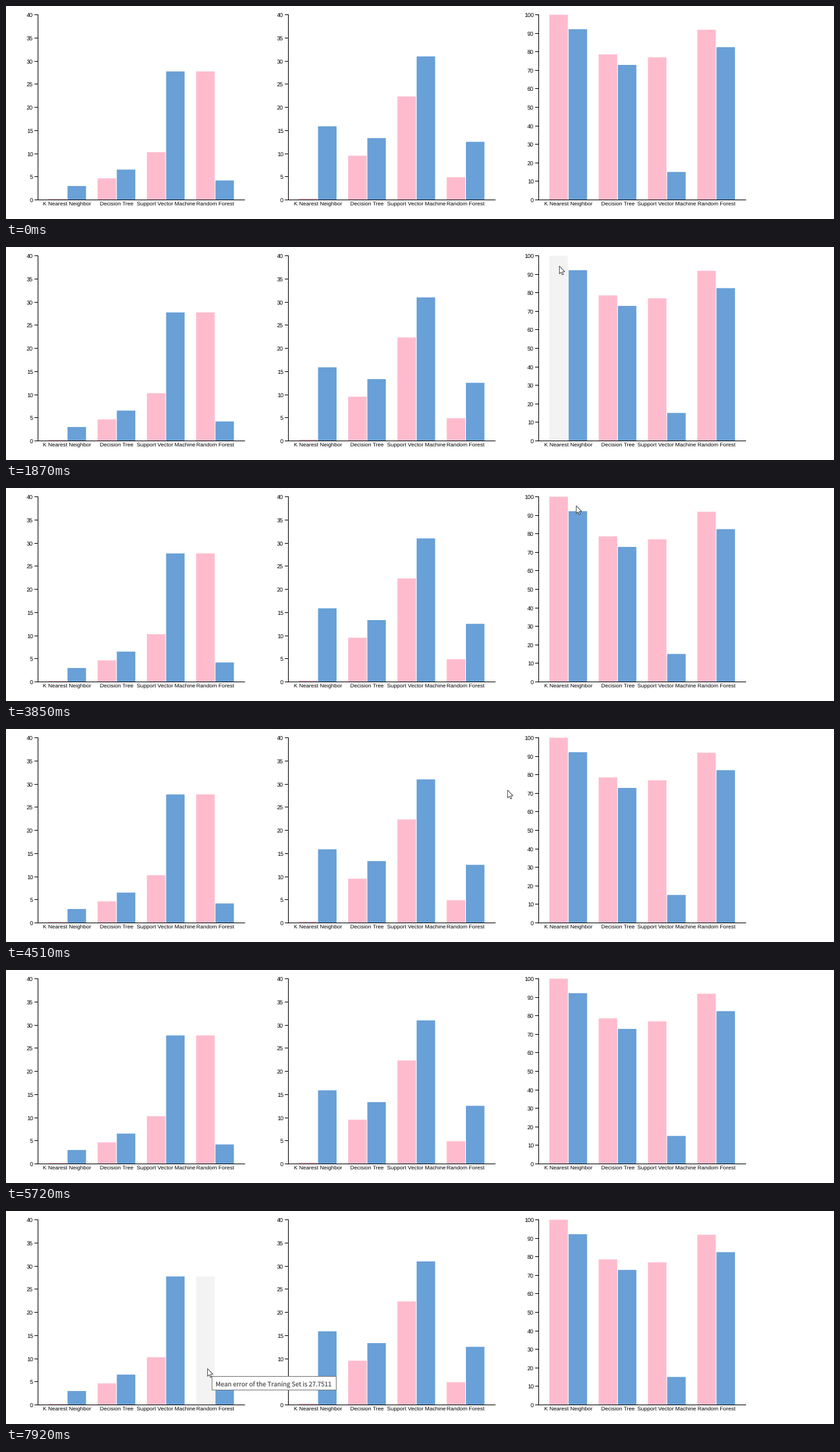
These frames come from a looping animation (1280x329 px, 8000 ms). A matplotlib script:

```python
import numpy as np
import matplotlib.pyplot as plt
from matplotlib.animation import FuncAnimation
from matplotlib.patches import Polygon, Rectangle

plt.rcParams["text.hinting"] = "none"

W, H, DPI = 1280, 329, 100
PX = 72 / DPI                       # points per pixel
LOOP, INTERVAL, STEP = 8000, 40, 110

PINK, BLUE, HOVER = "#ffbbce", "#68a0d7", "#f3f3f3"
BASE, TOP = 299.5, 13.5             # y of zero and of the axis maximum
FIRST_AXIS, CHART_GAP = 49, 387.3
GROUP_GAP, BAR_GAP, BAR_WIDTH = 76.2, 29.7, 28.6
MODELS = ["K Nearest Neighbor", "Decision Tree",
          "Support Vector Machine", "Random Forest"]

# axis maximum, tick step, training values, test values
CHARTS = [
    (40, 5, [0.2, 4.65, 10.3, 27.75], [3.0, 6.55, 27.75, 4.2]),
    (40, 5, [0.3, 9.55, 22.35, 4.9], [15.9, 13.35, 31.0, 12.55]),
    (100, 10, [100, 78.6, 77.0, 91.9], [92.2, 72.9, 15.1, 82.5]),
]

# pointer stops per visit: arrival step, leaving step, x, y
VISITS = [
    [(1, 1, 1119, 316), (4, 5, 1042, 315), (17, 34, 855, 29),
     (35, 35, 881, 27), (39, 40, 850, 100), (41, 41, 775, 94),
     (43, 44, 799, 3), (46, 46, 876, 54), (49, 50, 889, 171),
     (51, 51, 695, 250)],
    [(62, 62, 354, 316), (63, 72, 311, 243)],
]
HOVER_LAG = 0.25                    # the highlight trails the pointer, in steps

# tooltips: first step, end step, text
TIPS = [
    (22, 35, "Mean accuracy of the Traning Set is 100.00"),
    (70, 73, "Mean error of the Traning Set is 27.7511"),
]
FADE = 3                            # steps until a tooltip is solid

ARROW = 0.72 * np.array([(0, 0), (0, 16.5), (3.8, 13), (6.3, 18.8),
                         (8.8, 17.7), (6.4, 12), (11.6, 12)])

fig = plt.figure(figsize=(W / DPI, H / DPI), dpi=DPI, facecolor="white")
ax = fig.add_axes([0, 0, 1, 1])
ax.set_xlim(0, W)
ax.set_ylim(H, 0)
ax.axis("off")


def line(x0, y0, x1, y1):
    ax.plot([x0, x1], [y0, y1], color="black", lw=PX, zorder=3,
            solid_capstyle="butt", snap=False)


def label(x, y, text, ha, size):
    ax.text(x, y, text, ha=ha, va="baseline", color="black", zorder=3,
            family="Liberation Sans", size=size * PX)


def draw_chart(left, top_value, tick, train, test):
    """Draw one grouped bar chart and return its bars with their colours."""
    scale = (BASE - TOP) / top_value
    bars = []
    for i, model in enumerate(MODELS):
        x = left + 16.4 + GROUP_GAP * i
        for j, (values, color) in enumerate([(train, PINK), (test, BLUE)]):
            height = values[i] * scale
            bar = Rectangle((x + BAR_GAP * j, BASE - height), BAR_WIDTH,
                            height, facecolor=color, lw=0, zorder=1,
                            snap=False)
            ax.add_patch(bar)
            bars.append((bar, color))
        label(x + 29.4, 308.2, model, "center", 8.45)
    axis_x = np.floor(left) + 0.5
    line(axis_x, TOP - 0.5, axis_x, BASE + 0.5)
    line(axis_x, BASE, left + 320.5, BASE)
    for value in range(0, top_value + 1, tick):
        y = np.floor(BASE - value * scale) + 0.5
        line(axis_x - 5.5, y, axis_x, y)
        label(axis_x - 7.5, y + 3.2, str(value), "right", 9)
    return bars


bars = []
for n, chart in enumerate(CHARTS):
    bars += draw_chart(FIRST_AXIS + CHART_GAP * n, *chart)

tip_box = Rectangle((0, 0), 1, 21, facecolor="white", edgecolor="#767676",
                    lw=PX, zorder=5, snap=False)
tip_text = ax.text(0, 0, "", color="#575757", va="baseline", zorder=6,
                   family="Noto Sans CJK JP", size=9.75 * PX)
cursor = Polygon(ARROW, closed=True, facecolor="white", edgecolor="#222222",
                 lw=0.75 * PX, joinstyle="miter", zorder=8, snap=False)
ax.add_patch(tip_box)
ax.add_patch(cursor)


def pointer(step):
    """Return pointer and trailing hover position, or None when off stage."""
    for visit in VISITS:
        arrive, leave, x, y = np.array(visit, float).T
        if arrive[0] <= step <= leave[-1]:
            times = np.column_stack([arrive, leave]).ravel()
            return [(np.interp(s, times, x.repeat(2)),
                     np.interp(s, times, y.repeat(2)))
                    for s in (step, step - HOVER_LAG)]
    return None


def inside(bar, point):
    x, y = point
    return (bar.get_x() <= x <= bar.get_x() + bar.get_width()
            and bar.get_y() <= y <= BASE)


def show_tip(step, spots):
    tip = next((t for t in TIPS if t[0] <= step < t[1]), None)
    for artist in (tip_box, tip_text):
        artist.set_visible(tip is not None)
    if tip is None:
        return
    start, _, text = tip
    x, y = np.array(spots[0]) + (7.5, 12.5)
    tip_text.set_position((x + 6, y + 14.6))
    tip_text.set_text(text)
    tip_box.set_xy((x, y))
    tip_box.set_width(round(tip_text.get_window_extent().width) + 13)
    for artist in (tip_box, tip_text):
        artist.set_alpha(min(1, (step - start + 1) / FADE))


def update(i):
    step = (i * INTERVAL + INTERVAL - 1) // STEP
    spots = pointer(step)
    cursor.set_visible(spots is not None)
    if spots:
        cursor.set_xy(ARROW + np.array(spots[0]) + 0.5)
    for bar, color in bars:
        hit = spots is not None and inside(bar, spots[1])
        bar.set_facecolor(HOVER if hit else color)
    show_tip(step, spots)
    return [cursor, tip_box, tip_text] + [bar for bar, _ in bars]


anim = FuncAnimation(fig, update, frames=LOOP // INTERVAL, interval=INTERVAL,
                     repeat=True, repeat_delay=0, blit=False)
plt.show()
```
